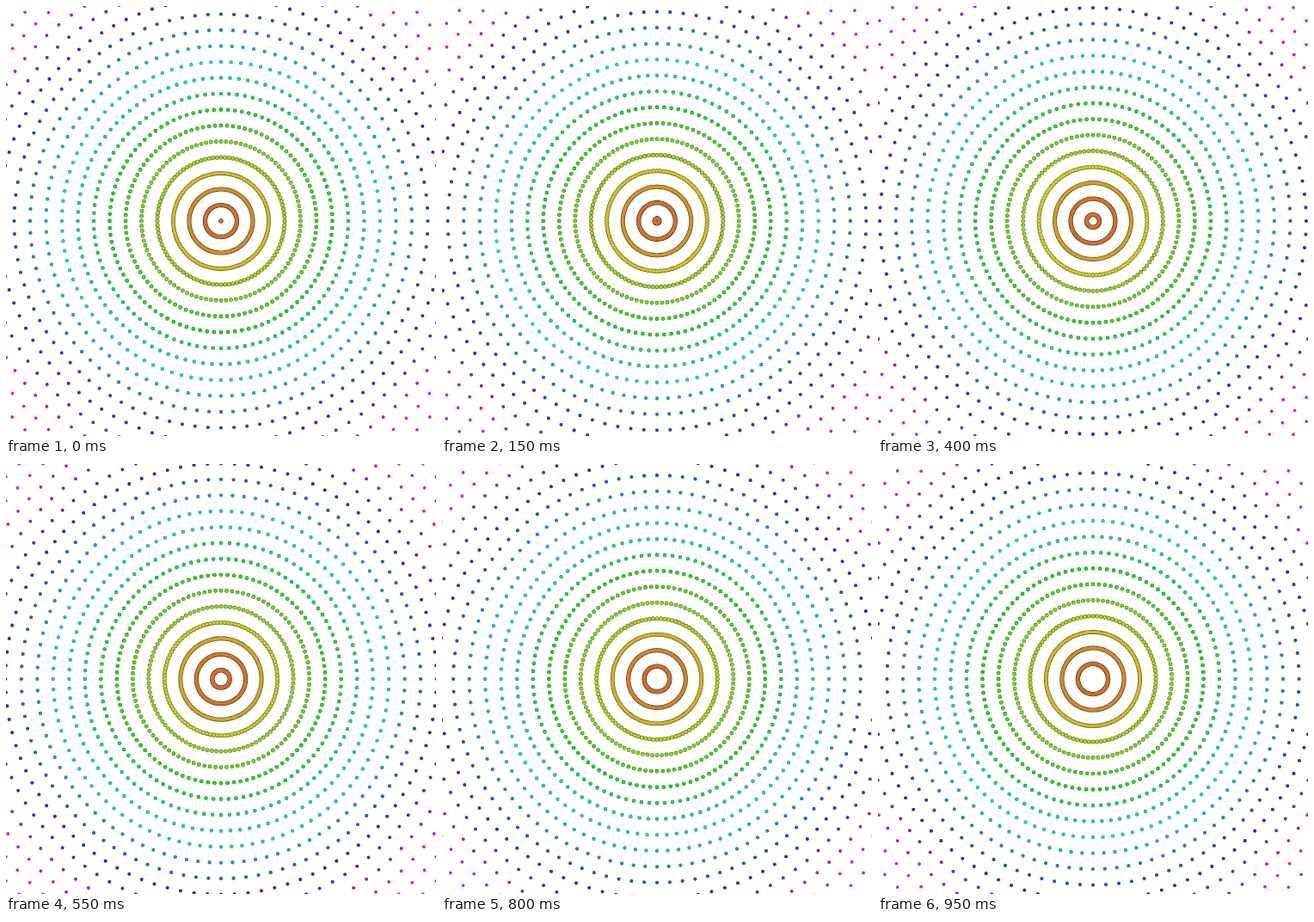
These frames come from a looping animation (500 by 500 pixels, 1000 ms). An HTML page with a canvas:

```html
<!DOCTYPE html>
<html lang="en">
<head>
<meta charset="utf-8">
<title>Expanding dot rings</title>
<style>
  html, body { margin: 0; width: 100%; height: 100%; overflow: hidden; background: #fff; }
  canvas { display: block; width: 500px; height: 500px; }
</style>
</head>
<body>
<canvas id="stage" width="500" height="500"></canvas>
<script>
  const ctx = document.getElementById('stage').getContext('2d');
  const CENTER = 250, GAP = 18.5, RINGS = 20, DOTS = 100;
  const LOOP = 1000, STEP = 50;

  // One path holding every dot of a ring
  function dotRing(radius, size, color) {
    ctx.fillStyle = color;
    ctx.beginPath();
    for (let i = 0; i < DOTS; i++) {
      const a = i / DOTS * 2 * Math.PI;
      const x = CENTER + radius * Math.cos(a);
      const y = CENTER + radius * Math.sin(a);
      ctx.moveTo(x + size, y);
      ctx.arc(x, y, size, 0, 2 * Math.PI);
    }
    ctx.fill();
  }

  function draw(phase) {
    ctx.fillStyle = '#fff';
    ctx.fillRect(0, 0, 500, 500);
    for (let k = 0; k < RINGS; k++) {
      const radius = (k + phase) * GAP;
      const hue = Math.max(25, radius * 0.95);
      const size = 2.7 - radius * 0.0025;
      const rim = Math.min(48, 15 + radius * 0.13);
      // dark rim first, then the colour on top
      dotRing(radius, size, `hsl(${hue}, 67%, ${rim}%)`);
      dotRing(radius, size - 0.55, `hsl(${hue}, 67%, 49%)`);
    }
  }

  let shown = -1;
  function tick() {
    const step = Math.floor(performance.now() % LOOP / STEP);
    if (step !== shown) {
      shown = step;
      draw(step * STEP / LOOP);
    }
    requestAnimationFrame(tick);
  }
  tick();
</script>
</body>
</html>
```
